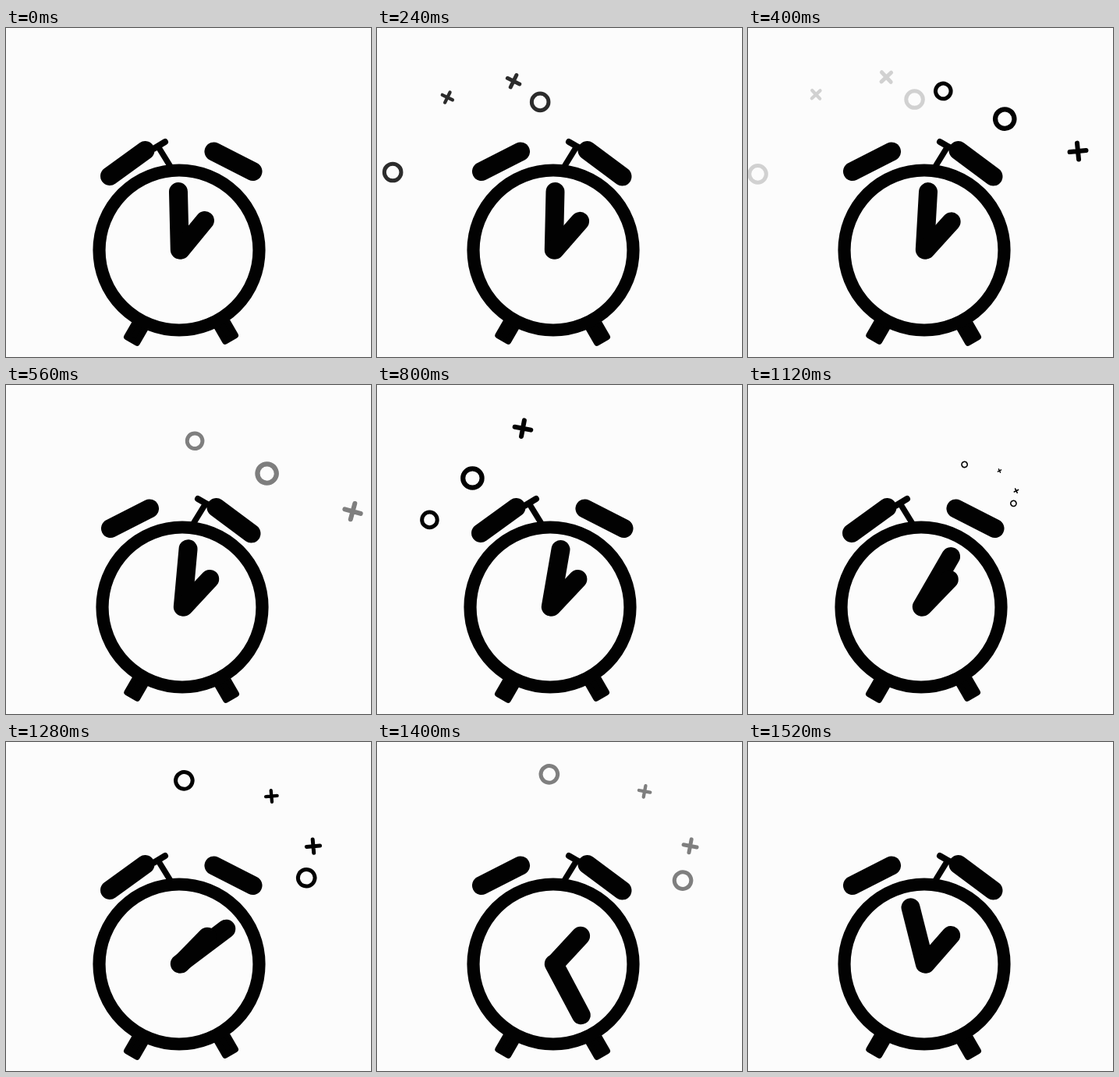
An HTML page with a canvas for the animation above (1.56 s loop, 468x422 px).

```html
<!DOCTYPE html>
<html lang="en">
<head>
<meta charset="utf-8">
<title>Ringing alarm clock</title>
<style>
  html, body { margin: 0; width: 100%; height: 100%; overflow: hidden; background: #fcfcfc; }
  canvas { display: block; width: 468px; height: 422px; }
</style>
</head>
<body>
<canvas id="stage"></canvas>
<script>
const W = 468, H = 422, STEP = 40, STEPS = 39;
const INK = '#020202';
const RAD = Math.PI / 180;

const canvas = document.getElementById('stage');
const ctx = canvas.getContext('2d');
const dpr = window.devicePixelRatio || 1;
canvas.width = W * dpr;
canvas.height = H * dpr;

// The two poses the clock rattles between.
const poses = [
  {
    x: 222,
    bells: [[133, 190, 178.5, 157], [266.5, 158.5, 316.5, 184]],
    shaft: [211, 178, 195, 152],
    head: [190, 154.5, 204, 146],
    feet: [[159.5, 403.5], [289.5, 401.5]]
  },
  {
    x: 226,
    bells: [[134, 184, 184, 158.5], [269.5, 157, 314.5, 190.5]],
    shaft: [240, 178, 256, 152],
    head: [246, 146, 259, 153.5],
    feet: [[159.8, 401.5], [290.5, 403.5]]
  }
];

// Hand angles: [step, degrees].
const minuteKeys = [[0, -1.4], [6, 1.3], [14, 5.2], [20, 9.8], [24, 17.2], [28, 30], [32, 53],
  [33, 66], [34, 95], [35, 152], [36, 235], [37, 305], [38, 345.8], [39, 358.6]];
const hourKeys = [[0, 39.5], [6, 41.2], [14, 43], [24, 43.5], [32, 44.3], [38, 41.3], [39, 39.5]];

const ring = (x, y, r, w) => ({ x, y, r, w });
const cross = (x, y, arm, w) => ({ x, y, arm, w });

const trio = [
  ring(-77.5, 28.5, 9.8, 5),
  ring(-6, -41, 12.2, 6.2),
  cross(78, -124, 10.5, 6)
];
const quartet = [
  ring(-123, 38, 10.8, 5),
  cross(-51, -60.5, 7.3, 4.3),
  cross(36, -82, 8.6, 5),
  ring(71, -54.5, 10.8, 5)
];
const bursts = [
  { start: 0, x: 140, y: 148, turn: 0, parts: quartet },
  { start: 6, x: 298, y: 134.5, turn: 68.5, parts: trio },
  { start: 17, x: 127, y: 151, turn: 0, parts: trio },
  { start: 27, x: 310.5, y: 137, turn: 64, parts: quartet }
];

function at(keys, n) {
  let i = 1;
  while (i < keys.length - 1 && keys[i][0] < n) i++;
  const [a, va] = keys[i - 1], [b, vb] = keys[i];
  return va + (vb - va) * (n - a) / (b - a);
}

function line(x1, y1, x2, y2, width) {
  ctx.lineWidth = width;
  ctx.beginPath();
  ctx.moveTo(x1, y1);
  ctx.lineTo(x2, y2);
  ctx.stroke();
}

function circle(x, y, r, width) {
  ctx.lineWidth = width;
  ctx.beginPath();
  ctx.arc(x, y, r, 0, Math.PI * 2);
  ctx.stroke();
}

function hand(x, y, length, deg) {
  line(x, y, x + length * Math.sin(deg * RAD), y - length * Math.cos(deg * RAD), 24);
}

function foot([x, y], deg) {
  ctx.save();
  ctx.translate(x, y);
  ctx.rotate(deg * RAD);
  ctx.lineJoin = 'round';
  ctx.lineWidth = 8;
  ctx.beginPath();
  ctx.rect(-7.5, -34, 15, 30);
  ctx.fill();
  ctx.stroke();
  ctx.restore();
}

function drawBurst(b, n) {
  const age = n - b.start;
  if (age <= 0 || age >= 11) return;
  const spread = 1.049 * (1 - Math.exp(-0.44 * age));
  const size = Math.min(1, age / 3);
  ctx.save();
  ctx.globalAlpha = Math.min(1, (11 - age) / 6);
  ctx.translate(b.x, b.y);
  ctx.rotate(b.turn * RAD);
  for (const p of b.parts) {
    ctx.save();
    ctx.translate(p.x * spread, p.y * spread);
    ctx.scale(size, size);
    if (p.r) {
      circle(0, 0, p.r, p.w);
    } else {
      ctx.rotate((5.2 * age - 5) * RAD);
      // One path, so the overlap does not darken while fading.
      ctx.lineWidth = p.w;
      ctx.beginPath();
      ctx.moveTo(-p.arm, 0);
      ctx.lineTo(p.arm, 0);
      ctx.moveTo(0, -p.arm);
      ctx.lineTo(0, p.arm);
      ctx.stroke();
    }
    ctx.restore();
  }
  ctx.restore();
}

function drawClock(n) {
  const pose = poses[(n >> 1) % 2];
  foot(pose.feet[0], 30);
  foot(pose.feet[1], -30);
  line(...pose.shaft, 7.5);
  line(...pose.head, 8);
  for (const bell of pose.bells) line(...bell, 24);
  ctx.fillStyle = '#fcfcfc';
  ctx.beginPath();
  ctx.arc(pose.x, 285, 100, 0, Math.PI * 2);
  ctx.fill();
  circle(pose.x, 285, 102.5, 16.2);
  hand(pose.x + 0.8, 284.5, 74.5, at(minuteKeys, n));
  hand(pose.x + 2, 284.5, 48.7, at(hourKeys, n));
}

function draw(n) {
  ctx.setTransform(dpr, 0, 0, dpr, 0, 0);
  ctx.fillStyle = '#fcfcfc';
  ctx.fillRect(0, 0, W, H);
  ctx.fillStyle = ctx.strokeStyle = INK;
  ctx.lineCap = 'round';
  for (const b of bursts) drawBurst(b, n);
  drawClock(n);
}

let begin;
function tick(now) {
  if (begin === undefined) begin = now;
  draw(Math.floor(Math.max(0, now - begin) / STEP) % STEPS);
  requestAnimationFrame(tick);
}
draw(0);
requestAnimationFrame(tick);
</script>
</body>
</html>
```
